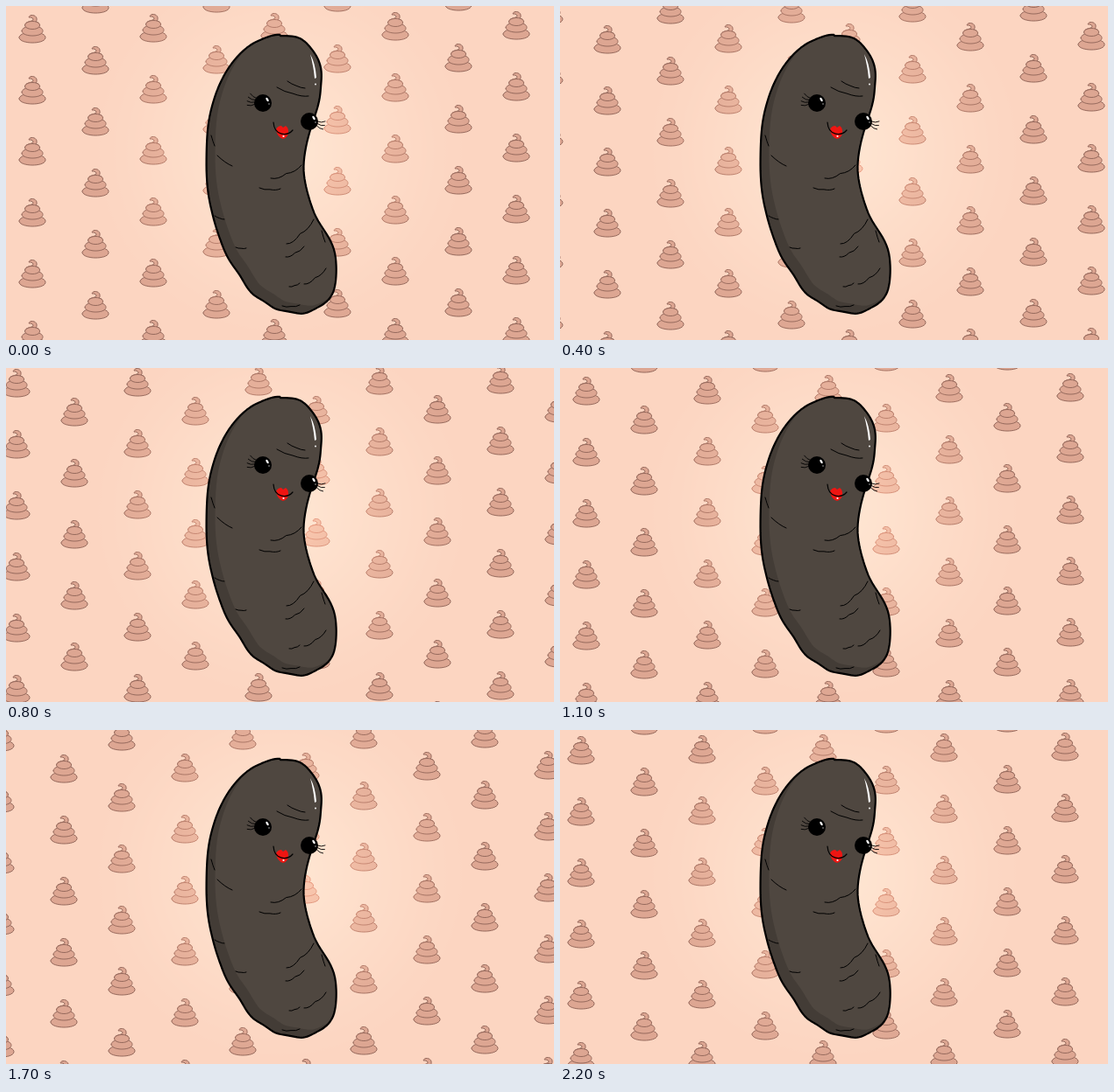
Write an HTML page with a canvas that moves like this. It is 625x382 px and loops after 2300 ms.

```html
<!DOCTYPE html>
<html>
<head>
<meta charset="utf-8">
<style>
html, body { margin: 0; width: 100%; height: 100%; overflow: hidden; background: #fcd5c1; }
canvas { display: block; width: 625px; height: 382px; }
</style>
</head>
<body>
<canvas id="stage" width="625" height="382"></canvas>
<script>
const W = 625, H = 382, STEP = 100, STEPS = 23, TAU = Math.PI * 2;
const ctx = document.getElementById('stage').getContext('2d');

// Closed spline through key points, with a slightly hand-drawn edge
function blob(p) {
  const path = new Path2D(), n = p.length;
  const spline = (a, b, c, d, t) => b + t / 2 * (c - a + t * (2 * a - 5 * b + 4 * c - d + t * (3 * (b - c) + d - a)));
  for (let i = 0; i < n; i++) {
    const [a, b, c, d] = [-1, 0, 1, 2].map(k => p[(i + k + n) % n]);
    for (let t = 0; t < 1; t += 0.1) {
      const s = (i + t) * 4;
      path.lineTo(spline(a[0], b[0], c[0], d[0], t) + 0.6 * Math.sin(s),
        spline(a[1], b[1], c[1], d[1], t) + 0.6 * Math.cos(s * 1.3));
    }
  }
  path.closePath();
  return path;
}

const body = blob([
  [313, 33.5], [343, 42], [358, 69], [359, 98], [349, 136], [339, 188], [352, 236],
  [375, 283], [374, 324], [353, 347], [329, 351], [304, 344], [282, 329], [262, 302],
  [247, 274], [236, 240], [228, 182], [234, 120], [252, 73], [285, 41]
]);

// Each wrinkle: start, then extent
const wrinkles = [
  [309, 93, 36, 10], [321, 86, 20, 8], [241, 171, 17, 12], [289, 208, 24, 1],
  [302, 197, 35, -15], [320, 272, 31, -28], [319, 287, 21, -12], [262, 276, 12, 1],
  [238, 240, 11, 4], [323, 321, 12, -4], [340, 318, 25, -18], [315, 343, 20, -1],
  [360, 257, 4, 13], [234, 148, 4, 12]
];

const smile = new Path2D('M305 133 C306 149 321 149 327 142');
const lips = new Path2D('M308 141 Q310 137 314 137 L316 139 L319 137 Q322 139 322 143 Q322 151 316 152 Q309 150 308 141Z');
const gleam = new Path2D('M347 55 Q353 66 354 82 L352 83 Q351 70 347 55Z');
const tip = new Path2D('M-8 -5 C-8 -9 2 -8 1 -11 C0 -13 -2 -13 -4 -13 C-3 -17 4 -16 5 -12 Q5.5 -9 4 -8 Q7 -8 8 -5');

// Rounded tier of the swirl: half width, middle, half height
function tier(w, y, h) {
  const path = new Path2D();
  path.moveTo(-w, y);
  path.bezierCurveTo(-w, y - h * 1.35, w, y - h * 1.35, w, y);
  path.bezierCurveTo(w, y + h * 1.35, -w, y + h * 1.35, -w, y);
  return path;
}
const swirl = [tier(15, 10, 6), tier(12, 2.5, 5.5), tip, tier(8.5, -4, 4.5)];

function icon(x, y) {
  ctx.save();
  ctx.translate(x, y);
  ctx.fillStyle = '#dda692';
  ctx.strokeStyle = '#95695c';
  ctx.lineWidth = 1;
  for (const part of swirl) {
    ctx.fill(part);
    ctx.stroke(part);
  }
  ctx.restore();
}

function dot(x, y, r, color) {
  ctx.fillStyle = color;
  ctx.beginPath();
  ctx.arc(x, y, r, 0, TAU);
  ctx.fill();
}

function line(path, width) {
  ctx.lineWidth = width;
  ctx.stroke(path);
}

function wrinkle([x, y, dx, dy]) {
  const sag = Math.hypot(dx, dy) / 9;
  const path = new Path2D();
  path.moveTo(x, y);
  path.quadraticCurveTo(x + dx * 0.25, y + dy * 0.15 + sag, x + dx / 2, y + dy / 2 + sag / 2);
  path.quadraticCurveTo(x + dx * 0.8, y + dy * 0.7 + sag, x + dx, y + dy);
  line(path, 1);
}

// Lashes fan out from a starting angle in degrees
function eye(x, y, start, count) {
  for (let i = 0; i < count; i++) {
    const a = (start + i * 15) * TAU / 360, c = Math.cos(a), s = Math.sin(a);
    const path = new Path2D();
    path.moveTo(x + 9 * c, y + 9 * s);
    path.quadraticCurveTo(x + 14 * c, y + 14 * s + 2, x + 18 * c, y + 18 * s);
    line(path, 0.9);
  }
  dot(x, y, 10, '#000');
  ctx.fillStyle = '#fff';
  ctx.beginPath();
  ctx.ellipse(x + 5, y - 4, 1.3, 2.5, -0.5, 0, TAU);
  ctx.fill();
  dot(x + 7, y + 1, 0.7, '#ccc');
}

const glow = ctx.createRadialGradient(313, 165, 0, 313, 165, 215);
for (let i = 0; i <= 8; i++) {
  const k = 1 - i / 8;
  glow.addColorStop(i / 8, `rgba(255,112,78,${k ** 1.2})`);
}

function pattern(step) {
  ctx.fillStyle = '#fcd5c1';
  ctx.fillRect(0, 0, W, H);
  for (let c = -2; c < 5; c++) {
    for (let r = -3; r < 7; r++) {
      const x = 30 + c * 138 + step * 6, y = 26 - c + r * 70 + step * 3;
      icon(x, y);
      icon(x + 72, y + 36);
    }
  }
  ctx.globalCompositeOperation = 'screen';
  ctx.fillStyle = glow;
  ctx.fillRect(0, 0, W, H);
  ctx.globalCompositeOperation = 'source-over';
}

function figure() {
  ctx.lineCap = ctx.lineJoin = 'round';
  ctx.strokeStyle = '#000';
  ctx.save();
  ctx.clip(body);
  ctx.fillStyle = '#433c36';
  ctx.fillRect(0, 0, W, H);
  ctx.translate(10, -9);
  ctx.fillStyle = '#4f4740';
  ctx.fill(body);
  ctx.restore();
  line(body, 2.2);
  wrinkles.forEach(wrinkle);
  ctx.fillStyle = '#fff';
  ctx.fill(gleam);
  dot(353, 89.5, 1, '#fff');
  eye(293, 111, 172, 4);
  eye(346, 132, 0, 3);
  ctx.fillStyle = '#ee1512';
  ctx.fill(lips);
  line(smile, 1.2);
  dot(316.5, 149, 1.1, '#fff');
}

function draw(now) {
  pattern(Math.floor(now / STEP) % STEPS);
  figure();
  requestAnimationFrame(draw);
}
draw(0);
</script>
</body>
</html>
```
